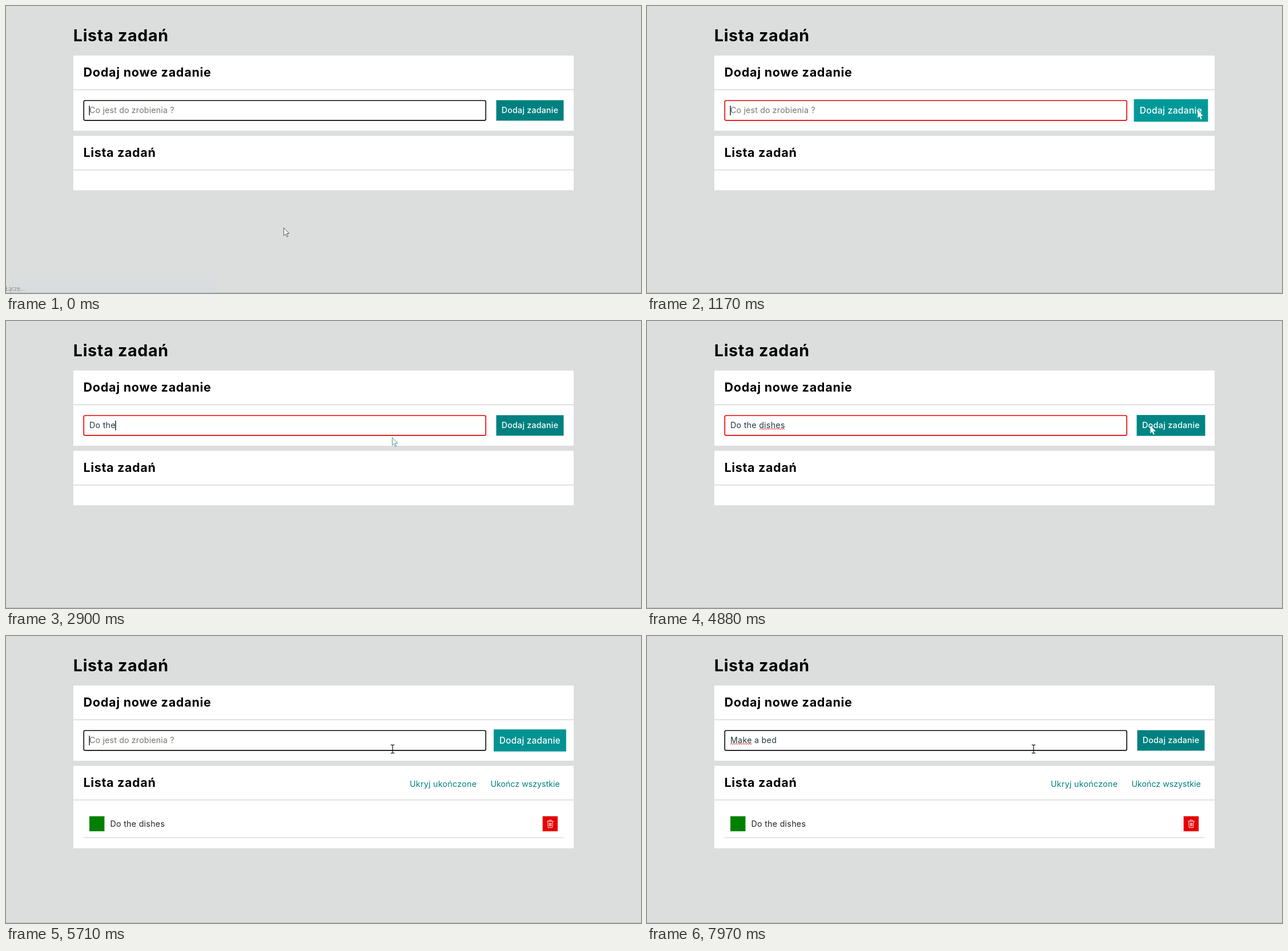
Animation of 1112 by 504 pixels, one loop 8 s. Source, as an HTML page:

```html
<!DOCTYPE html>
<html lang="pl">
<head>
<meta charset="utf-8">
<title>Lista zadań</title>
<style>
  html, body { margin: 0; width: 100%; height: 100%; overflow: hidden; background: #dcdedd; }
  svg { display: block; width: 1112px; height: 504px; }
  text { font: 14.2px Inter, "Open Sans", sans-serif; letter-spacing: .3px; white-space: pre; fill: #222; }
  .h1 { font-size: 28.6px; font-weight: 700; letter-spacing: .7px; fill: #000; }
  .h2 { font-size: 21.5px; font-weight: 700; letter-spacing: .65px; fill: #000; }
  .link { fill: #008080; }
  .status { font: 10px "Open Sans", sans-serif; letter-spacing: 0; fill: #858787; }
</style>
</head>
<body>
<svg viewBox="0 0 1112 504">
  <rect width="1112" height="504" fill="#dcdedd"/>
  <rect y="503" width="1112" height="1" fill="#b9bbba"/>
  <g id="status">
    <rect x="-1" y="486" width="369" height="17" fill="#dadddf" stroke="#d3d7da" stroke-width=".6"/>
    <text class="status" x="-1" y="499.5">Łączę...</text>
  </g>

  <text class="h1" x="117.8" y="61.5">Lista zadań</text>
  <rect x="118" y="87" width="876" height="132" fill="#fff"/>
  <rect x="118" y="146.2" width="876" height="1.8" fill="#dcdedd"/>
  <text class="h2" x="135.5" y="124" style="letter-spacing:.75px">Dodaj nowe zadanie</text>

  <rect id="field" x="136.2" y="166" width="704" height="34.9" rx="2.4" fill="#fff" stroke-width="1.6"/>
  <text id="hint" x="146" y="188.3" style="letter-spacing:.18px;fill:#757570">Co jest do zrobienia ?</text>
  <text id="typed" x="146" y="188.3" style="fill:#22383a"></text>
  <path id="wave" fill="none" stroke="#e8262a" stroke-width="1"/>
  <rect id="caret" y="175" width="1.3" height="17" fill="#000"/>

  <g id="button">
    <rect id="face" x="-59" y="-18" width="118" height="36"/>
    <text y="4.9" text-anchor="middle" style="fill:#fff;font-weight:500;letter-spacing:.25px">Dodaj zadanie</text>
  </g>

  <rect id="card" x="118" y="228" width="876" height="95.5" fill="#fff"/>
  <rect x="118" y="287" width="876" height="1.8" fill="#dcdedd"/>
  <text class="h2" x="135.5" y="264.8">Lista zadań</text>

  <g id="list">
    <text class="link" x="707" y="264.5">Ukryj ukończone</text>
    <text class="link" x="848.5" y="264.5" style="letter-spacing:0">Ukończ wszystkie</text>
    <rect x="146" y="316.5" width="26.4" height="26.4" fill="#008000"/>
    <text x="182.5" y="335">Do the dishes</text>
    <rect x="939.7" y="316.5" width="26.4" height="26.4" fill="#e60000"/>
    <path d="M947.2 325.3h11.6M951 325v-1.8h4v1.8M948.6 325.5l.8 11h7.2l.8-11M951.3 327.8l.3 6.4M953 327.8v6.4M954.7 327.8l-.3 6.4"
      fill="none" stroke="#fff" stroke-width=".9"/>
    <rect x="135.5" y="353.5" width="841" height="1.4" fill="#dcdcdc"/>
  </g>

  <path id="arrow" d="M.4 .5V14.2L3.5 11.3 5.7 16.4 7.8 15.5 5.6 10.5H9.8Z" fill="#fff" stroke-width=".9"/>
  <path id="beam" d="M-3.2 -7.2H-.9L0 -6.6 .9 -7.2H3.2M0 -6.6V6.6M-3.2 7.2H-.9L0 6.6 .9 7.2H3.2"
    fill="none" stroke="#111" stroke-width="1.2"/>
</svg>
<script>
const LOOP = 8000, BLINK = 530, FADE = 500;
const REJECT = 1110, ADDED = 5230;
const $ = id => document.getElementById(id);
const [status, field, hint, typed, wave, caret, button, face, card, list, arrow, beam] =
  ["status", "field", "hint", "typed", "wave", "caret", "button", "face", "card", "list", "arrow", "beam"].map($);

// Each entry: text and the time of every keystroke
const phrases = [
  ["Do the dishes", [2290, 2430, 2500, 2630, 2770, 2900, 3040, 3180, 3250, 3380, 3450, 3590, 3850]],
  ["Make a bed", [6210, 6350, 6420, 6560, 6700, 6900, 7030, 7230, 7360, 7430]]
];
const caretResets = [-110, REJECT, ADDED, ...phrases[0][1], ...phrases[1][1]].sort((a, b) => a - b);

// Pointer path: time, x, y
const path = [
  [0, 486, 389], [60, 486, 389], [410, 858, 199], [620, 935, 188], [820, 955, 185],
  [1100, 964, 182.5], [1660, 964, 182.5], [1770, 905, 205], [1900, 800, 215],
  [2150, 676, 204], [4580, 676, 204], [4810, 859, 186], [4880, 881, 183.2],
  [5080, 897, 185], [5480, 897, 185], [5620, 855, 188], [5700, 677, 198.5], [LOOP, 677, 198.5]
];
// Hover spans of the button
const hovers = [[425, 1720], [4810, 5620]];

const clamp = v => Math.min(1, Math.max(0, v));
const show = (el, on) => el.setAttribute("visibility", on ? "visible" : "hidden");

// The CSS "ease" curve, solved by bisection
function ease(x) {
  if (x <= 0 || x >= 1) return clamp(x);
  const bez = (a, b, u) => 3 * a * u * (1 - u) ** 2 + 3 * b * u * u * (1 - u) + u ** 3;
  let lo = 0, hi = 1;
  for (let i = 0; i < 20; i++) {
    const mid = (lo + hi) / 2;
    if (bez(.25, .25, mid) < x) lo = mid; else hi = mid;
  }
  return bez(.1, 1, lo);
}

function pointerAt(t) {
  const i = Math.max(1, path.findIndex(p => p[0] > t));
  const [t0, x0, y0] = path[i - 1], [t1, x1, y1] = path[i];
  const k = clamp((t - t0) / (t1 - t0));
  return [x0 + (x1 - x0) * k, y0 + (y1 - y0) * k];
}

function textAt(t) {
  const [text, times] = phrases[t < ADDED ? 0 : 1];
  return text.slice(0, times.filter(k => k <= t).length);
}

function squiggle(x0, x1) {
  let d = `M${x0} 190.3`;
  for (let x = x0 + 2, up = true; x <= x1; x += 2, up = !up) d += `L${x} ${up ? 188.7 : 190.3}`;
  return d;
}

function drawField(t) {
  const text = textAt(t);
  typed.textContent = text;
  show(hint, !text);
  field.setAttribute("stroke", t >= REJECT && t < ADDED ? "#e60000" : "#0a0a0a");

  const last = caretResets.filter(k => k <= t).pop();
  show(caret, Math.floor((t - last) / BLINK) % 2 === 0);
  caret.setAttribute("x", 145.4 + (text ? typed.getComputedTextLength() : 0));

  const marked = t >= 4660 && t < ADDED ? [197, 242] : t >= 6700 ? [146, 184] : null;
  wave.setAttribute("d", marked ? squiggle(...marked) : "");
}

function drawButton(t) {
  const glow = hovers.reduce((sum, [on, off]) =>
    sum + ease((t - on) / FADE) - ease((t - off) / FADE), 0);
  const tone = Math.round(128 + 25 * glow);
  button.setAttribute("transform", `translate(917.5 183.4) scale(${1 + .1 * glow})`);
  face.setAttribute("fill", `rgb(0,${tone},${tone})`);
}

function drawPointer(t) {
  const [x, y] = pointerAt(t);
  const inField = x > 136 && x < 841 && y > 166 && y < 201;
  const onButton = hovers.some(([on, off]) => t >= on && t < off);
  show(beam, inField);
  show(arrow, !inField);
  beam.setAttribute("transform", `translate(${x} ${y})`);
  arrow.setAttribute("transform", `translate(${x} ${y})`);
  arrow.setAttribute("stroke", onButton ? "none" : t < 1000 ? "#444" : "#2b8c8c");
}

function draw(t) {
  status.setAttribute("opacity", 1 - clamp((t - 60) / 180));
  drawField(t);
  drawButton(t);
  show(list, t >= ADDED);
  card.setAttribute("height", t >= ADDED ? 144.8 : 95.5);
  drawPointer(t);
}

let start;
function tick(now) {
  start ??= now;
  draw((now - start) % LOOP);
  requestAnimationFrame(tick);
}
draw(0);
requestAnimationFrame(tick);
</script>
</body>
</html>
```
